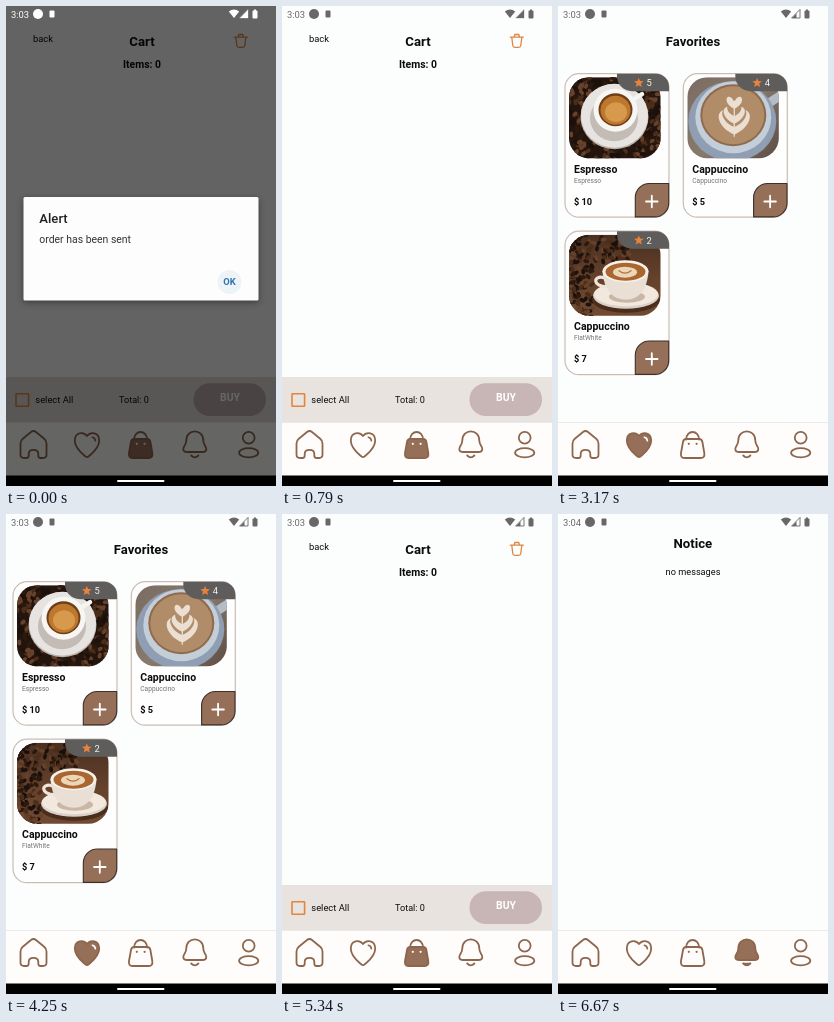
Write an HTML page with a canvas that moves like this. It is 270 px wide and 480 px high and loops after 8 s.

```html
<!DOCTYPE html>
<html lang="en">
<head>
<meta charset="utf-8">
<title>Coffee shop app</title>
<style>
html, body { margin: 0; width: 100%; height: 100%; overflow: hidden; background: #fff; }
canvas { display: block; width: 270px; height: 480px; }
</style>
</head>
<body>
<canvas id="stage" width="270" height="480"></canvas>
<script>
const ctx = document.getElementById('stage').getContext('2d');
const LOOP = 8000;
const BROWN = '#966f59', LINE = '#8d664d', ORANGE = '#e08540', PAGE = '#fcfdfd';

function text(str, x, y, size, { weight = 400, color = '#0c0c0c', align = 'left' } = {}) {
  ctx.font = `${weight} ${size}px Roboto, sans-serif`;
  ctx.textAlign = align;
  ctx.fillStyle = color;
  ctx.fillText(str, x, y);
}

function rect(x, y, w, h, color) {
  ctx.fillStyle = color;
  ctx.fillRect(x, y, w, h);
}

function box(x, y, w, h, radius, fill, stroke, width = 1) {
  ctx.beginPath();
  ctx.roundRect(x, y, w, h, radius);
  paint(fill, stroke, width);
}

function oval(x, y, rx, ry, fill, stroke, width = 1, angle = 0) {
  ctx.beginPath();
  ctx.ellipse(x, y, rx, ry, angle, 0, Math.PI * 2);
  paint(fill, stroke, width);
}

function paint(fill, stroke, width) {
  if (fill) { ctx.fillStyle = fill; ctx.fill(); }
  if (stroke) { ctx.strokeStyle = stroke; ctx.lineWidth = width; ctx.stroke(); }
}

function path(d, fill, stroke, width = 1.8) {
  const p = new Path2D(d);
  if (fill) { ctx.fillStyle = fill; ctx.fill(p); }
  if (stroke) { ctx.strokeStyle = stroke; ctx.lineWidth = width; ctx.stroke(p); }
}

function mix(from, to, k) {
  return `rgb(${from.map((v, i) => Math.round(v + (to[i] - v) * k))})`;
}

function seeded(seed) {
  return () => (seed = (seed * 16807) % 2147483647) / 2147483647;
}

function statusBar(clock, color, weakSignal) {
  text(clock, 5, 11.6, 9.4, { color });
  oval(32, 8, 5, 5, color);
  box(43.5, 4.5, 5, 7, 1, color);
  path('M222.8 5.4 Q228 1.8 233.2 5.4 L228 12Z', color);
  path('M242 3.8 V12 H234Z', weakSignal ? null : color, color, weakSignal ? .9 : .3);
  if (weakSignal) path('M238.5 7.5 V12 H234Z', color);
  box(246.5, 4.5, 5, 8, 1, color);
  rect(248, 3.5, 2, 1.5, color);
}

function navBar(active) {
  rect(0, 417, 270, 53, '#fefdfc');
  rect(0, 416, 270, 1, '#eceae8');
  const fill = name => (name === active ? BROWN : null);

  path('M14.5 437.5 Q14.5 434.5 16.8 432.7 L25 426 Q27.5 424 30 426 L38.2 432.7 Q40.5 434.5 40.5 437.5 V448.5 Q40.5 452 37 452 H34.5 Q32.3 452 32.3 449.5 V448 Q32.3 443.8 27.5 443.8 Q22.7 443.8 22.7 448 V449.5 Q22.7 452 20.5 452 H18 Q14.5 452 14.5 448.5Z', null, LINE);

  path('M81 430 C77.5 425.5 68.8 426 68.8 434.5 C68.8 442.5 76 447.5 79.5 450.5 Q81 451.7 82.5 450.5 C86 447.5 93.2 442.5 93.2 434.5 C93.2 426 84.5 425.5 81 430Z', fill('heart'), LINE);
  path('M86.3 431.2 Q89 431.6 89.4 434.8', null, active === 'heart' ? '#fff' : LINE, 1.6);

  path('M128.2 433.5 C128.2 423.5 141 423.5 141 433.5', null, LINE);
  path('M128 433 H141.3 Q143.8 433 144.4 436 L146.3 447 Q147 452 142.7 452 H126.5 Q122.2 452 123 447 L125 436 Q125.6 433 128 433Z', fill('bag'), LINE);
  const eyes = active === 'bag' ? '#fff' : LINE;
  oval(130.8, 437.8, 1.1, 1.1, eyes);
  oval(138.6, 437.8, 1.1, 1.1, eyes);

  path('M180.3 434.5 C180.3 422.3 197.3 422.3 197.3 434.5 C197.3 439 200.3 440 200.3 443 Q200.3 446 196.3 446 H181.3 Q177.3 446 177.3 443 C177.3 440 180.3 439 180.3 434.5Z', fill('bell'), LINE);
  path('M185.2 449.5 Q188.8 453.2 192.4 449.5', fill('bell'), LINE);
  if (active === 'bell') path('M185.2 449.3 H192.4', null, LINE, 1.2);

  oval(242.7, 431.8, 5.9, 5.9, null, LINE, 1.8);
  oval(242.7, 446.8, 9.6, 4.6, null, LINE, 1.8);
}

function systemBar() {
  rect(0, 469.5, 270, 10.5, '#000');
  box(111, 474, 47.5, 2, 1, '#fff');
}

function cart(settled = 1) {
  rect(0, 0, 270, 470, mix([248, 248, 248], [252, 253, 253], settled));
  text('back', 27, 36.2, 9.4);
  text('Cart', 136, 40, 13.2, { weight: 700, align: 'center' });
  text('Items: 0', 136, 61.8, 10.4, { weight: 700, align: 'center' });

  path('M228.3 31.2 H241.3 M232.2 31 L232.8 28.5 H236.8 L237.4 31 M229.8 31.5 L230.8 39.5 Q231 41.4 233 41.4 H236.6 Q238.6 41.4 238.8 39.5 L239.8 31.5', null, ORANGE, 1.3);

  rect(0, 371, 270, 46, mix([224, 219, 216], [233, 227, 223], settled));
  box(10, 387.7, 12.6, 12.6, .5, null, ORANGE, 1.6);
  text('select All', 29.3, 397.4, 9.4);
  text('Total: 0', 113, 397.4, 9.1);
  box(187.5, 377.3, 72.5, 32.7, 16.3, mix([184, 168, 167], [200, 181, 182], settled));
  text('BUY', 224, 395.3, 10.4, { weight: 700, color: '#fff', align: 'center' });
  navBar('bag');
}

function beans(seed, x, y, w, h, count) {
  const rnd = seeded(seed);
  const tones = ['#4b2d1b', '#1b100b', '#67412a', '#2c190e'];
  for (let i = 0; i < count; i++) {
    oval(x + rnd() * w, y + rnd() * h, 3, 1.9, tones[i % 4], null, 1, rnd() * Math.PI);
  }
}

function espressoPhoto() {
  rect(0, 0, 92, 82, '#23140d');
  beans(17, 0, 0, 92, 82, 320);
  oval(45.5, 39.5, 34, 32.5, '#b9b3ae');
  oval(45.5, 38.5, 33.5, 32, '#e6e3e0');
  oval(45, 41, 24, 23, '#c3bcb6');
  path('M62 24 L73 17', null, '#f7f5f2', 4.5);
  oval(46.5, 33, 22, 21.5, '#f8f6f3');
  oval(46.5, 32.5, 17, 16.5, '#6f3d17');
  oval(46.5, 33, 15, 14.5, '#bd782e');
  oval(47, 35, 11, 10, '#d79a4d');
}

function cappuccinoPhoto() {
  const table = ctx.createLinearGradient(0, 0, 92, 82);
  table.addColorStop(0, '#7b6c61');
  table.addColorStop(.5, '#88796d');
  table.addColorStop(1, '#5c4c43');
  rect(0, 0, 92, 82, table);
  path('M76 30 Q90 20 94 18', null, '#b4bcc6', 9);
  oval(45, 44, 44, 40, '#8f9eb2');
  oval(46, 40, 38, 36, '#c3ced9');
  oval(46, 38, 33, 31, '#8e6b4e');
  oval(46, 38, 31, 29, '#b18c69');
  // latte art: layered leaves below a small heart
  const leaf = (y, s, color) => {
    ctx.save();
    ctx.translate(47, y);
    ctx.scale(s, s);
    path('M0 14 C-15 7 -17 -5 -11 -8 C-6 -9 -2 -3 0 2 C2 -3 6 -9 11 -8 C17 -5 15 7 0 14Z', color);
    ctx.restore();
  };
  leaf(42, 1.1, '#eadfd1');
  leaf(38, .85, '#b18c69');
  leaf(36, .75, '#eadfd1');
  leaf(32, .5, '#b18c69');
  leaf(24, .55, '#eadfd1');
  path('M47 24 V59', null, '#eadfd1', 1.3);
}

function flatWhitePhoto() {
  const table = ctx.createLinearGradient(0, 0, 0, 82);
  table.addColorStop(0, '#4a2f20');
  table.addColorStop(.55, '#65422c');
  table.addColorStop(1, '#714a31');
  rect(0, 0, 92, 82, table);
  beans(41, 0, 0, 60, 28, 100);
  beans(29, 0, 28, 24, 54, 80);
  oval(57, 65, 34, 13, '#4a2d1d');
  oval(57, 61, 33, 13, '#d9d0c7');
  oval(57, 59.5, 32, 12, '#f2e8de');
  oval(58, 62, 18, 6, '#c9b6a5');
  path('M35 43 C24 40 23 52 38 52', null, '#eee4da', 3.2);
  path('M33.5 36 C34.5 54 43 65 57 65 C71 65 78.5 53 79.5 36Z', '#eadfd4');
  oval(56.5, 36.5, 23, 11, '#f8f1e8');
  oval(56.5, 37, 20, 9, '#a96631');
  oval(56, 37.5, 12, 5.5, '#ecd6b8');
  path('M50 36 Q56 41 62 36', null, '#b4743f', 1.2);
}

function star(x, y, r) {
  ctx.beginPath();
  for (let i = 0; i < 10; i++) {
    const a = -Math.PI / 2 + i * Math.PI / 5, d = i % 2 ? r * .45 : r;
    ctx.lineTo(x + d * Math.cos(a), y + d * Math.sin(a));
  }
  ctx.closePath();
  paint('#e9833b');
}

function card(x, y, { name, kind, price, stars, photo }) {
  ctx.save();
  ctx.translate(x, y);
  box(0, 0, 104, 143.5, 14, '#fefefe', '#cbbdb5', 1.2);

  ctx.save();
  ctx.translate(4, 3.5);
  ctx.beginPath();
  ctx.roundRect(0, 0, 91.5, 81, 20);
  ctx.clip();
  photo();
  ctx.restore();

  box(52, 0, 52, 17.5, [0, 13, 0, 15], '#5f5d5c');
  star(73.8, 9.2, 5);
  text(stars, 81.5, 12.6, 9.4, { color: '#f4f4f4' });

  text(name, 9, 98.8, 10.5, { weight: 700 });
  text(kind, 9, 109.2, 6.6, { color: '#747474' });
  text(price, 9, 130.8, 9.2, { weight: 700 });

  box(70.3, 109.8, 33.4, 33.4, [14, 0, 14, 0], BROWN, '#3d302a', 1.1);
  path('M81 127.8 H92.6 M86.8 122 V133.6', null, '#fff', 1.8);
  ctx.restore();
}

const favorites = [
  { x: 7, y: 67.7, name: 'Espresso', kind: 'Espresso', price: '$ 10', stars: 5, photo: espressoPhoto },
  { x: 125.3, y: 67.7, name: 'Cappuccino', kind: 'Cappuccino', price: '$ 5', stars: 4, photo: cappuccinoPhoto },
  { x: 7, y: 225.2, name: 'Cappuccino', kind: 'FlatWhite', price: '$ 7', stars: 2, photo: flatWhitePhoto },
];

function favoritesPage() {
  rect(0, 0, 270, 470, PAGE);
  text('Favorites', 135, 40, 13.1, { weight: 700, align: 'center' });
  favorites.forEach(item => card(item.x, item.y, item));
  navBar('heart');
}

function noticePage() {
  rect(0, 0, 270, 470, PAGE);
  text('Notice', 134.8, 34, 13.2, { weight: 700, align: 'center' });
  text('no messages', 135, 60.5, 9.2, { align: 'center' });
  navBar('bell');
}

function alertDialog() {
  rect(0, 0, 270, 470, 'rgba(0,0,0,.6)');
  ctx.save();
  ctx.shadowColor = 'rgba(0,0,0,.4)';
  ctx.shadowBlur = 6;
  ctx.shadowOffsetY = 2;
  box(17.5, 191, 235, 103.5, 1.5, '#fdfdfd');
  ctx.restore();
  text('Alert', 33.3, 216.6, 13.1, { weight: 500, color: '#222' });
  text('order has been sent', 33.3, 237, 10.45, { color: '#333' });
  oval(223.5, 276, 12, 12, '#edf4f8');
  text('OK', 223.5, 279.4, 9.4, { weight: 700, color: '#3273a8', align: 'center' });
}

function draw(t) {
  const clock = t < 6380 ? '3:03' : '3:04';
  if (t < 40) {
    cart(0);
    alertDialog();
  } else if (t < 3170) {
    cart(Math.min(1, (t - 40) / 400));
  } else if (t < 5340) {
    favoritesPage();
  } else if (t < 6670) {
    cart();
  } else {
    noticePage();
  }
  statusBar(clock, t < 40 ? '#fff' : '#686868', t >= 3170);
  systemBar();
}

ctx.lineCap = ctx.lineJoin = 'round';
const start = performance.now();
function tick() {
  draw((performance.now() - start) % LOOP);
  requestAnimationFrame(tick);
}
tick();
</script>
</body>
</html>
```
